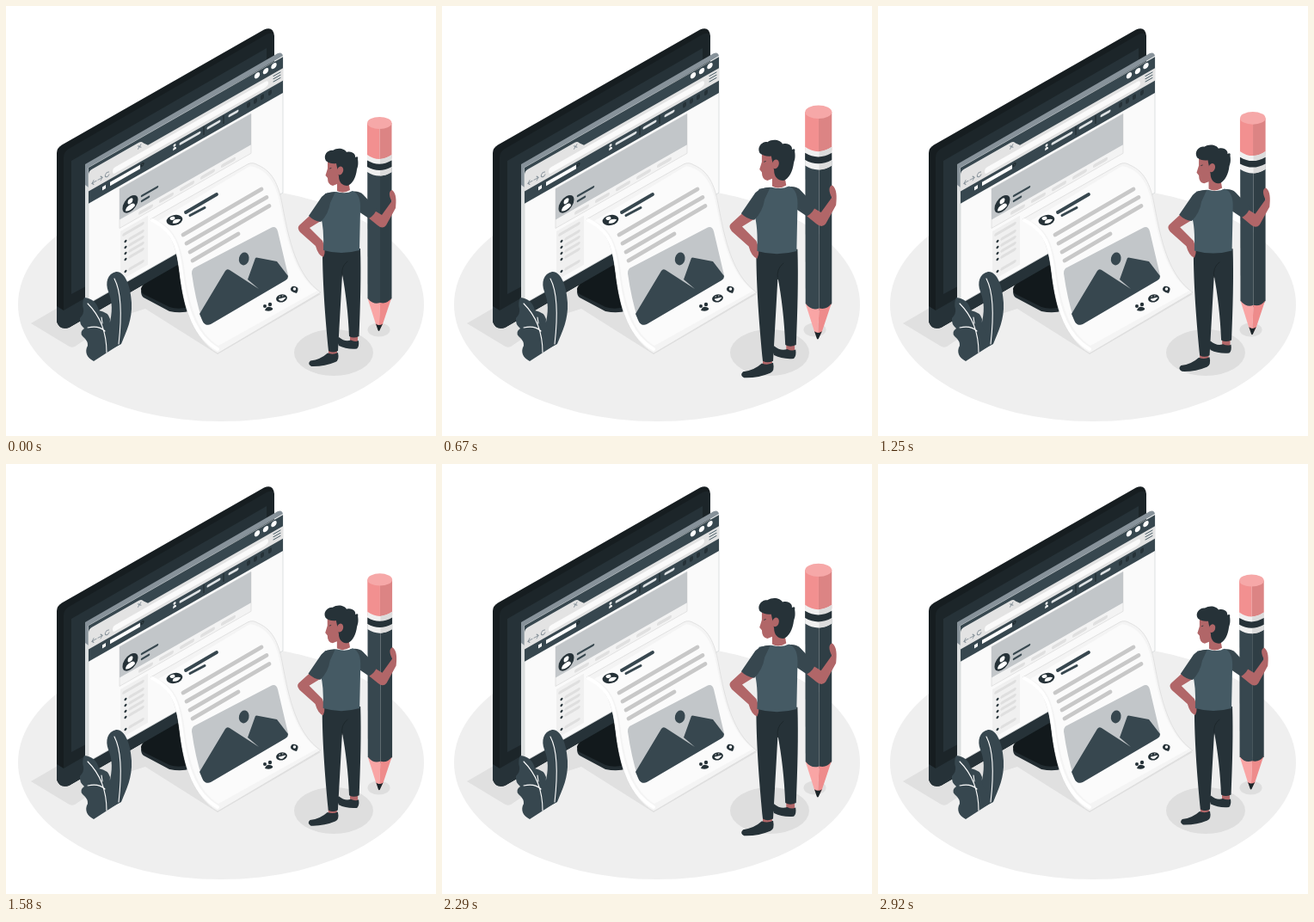
Animation of 500 by 500 pixels, one loop 2.96 s. Source, as an HTML page:

```html
<!DOCTYPE html>
<html lang="en">
<head>
<meta charset="utf-8">
<style>
html, body { margin: 0; width: 100%; height: 100%; overflow: hidden; background: #fff }
svg { display: block; width: 100vw; height: 100vh }
.dark { fill: #263238 }
.slate { fill: #37474f }
.skin { fill: #b16668 }
.line { fill: none; stroke-linecap: round }
</style>
</head>
<body>
<svg viewBox="0 0 500 500">
  <ellipse cx="250" cy="347" rx="236" ry="136" fill="#efefef"/>
  <path d="M29 369 60 351 200 290 366 335 246 405 162 352 130 362 80 396Q76 398 72 395Z" fill="#e0e0e0"/>
  <ellipse cx="381" cy="403" rx="46" ry="27" fill="#dedede"/>
  <ellipse cx="433.500" cy="376.500" rx="13" ry="8" fill="#dedede"/>

  <!-- monitor -->
  <path d="M157 331 188 347Q200 352 215 346V354Q205 358 190 355L160 339Q157 337 157 331Z" fill="#222c31"/>
  <path d="M157 330Q157 325 163 321L197 301 215 300V349Q202 354 190 350L160 335Q157 333 157 330Z" fill="#12191c"/>
  <path d="M59 171Q59 165 65 161.500L300 27.500Q311 23 312 35V236L73 374Q62 377 59 367Z" fill="#161d20"/>
  <path d="M67 176Q67 170 73 166L303 33Q312 29 312 38V236L73 374Q67 376 67 369Z" fill="#1c2529"/>
  <path d="M76 180 303 49V214L76 335Z" class="dark"/>
  <path d="M59 349 67 354 312 213V236L73 374Q62 377 59 367Z" class="dark"/>

  <!-- browser window -->
  <path d="M92 184 316 55Q321 53 322 58L96 190V346L92 343Z" fill="#87929a"/>
  <path d="M92 208 96 211V346L92 343Z" fill="#dcdfe0"/>
  <g transform="matrix(1 -.57 0 1 96 188)">
    <path d="M0 0H226V158H0Z" fill="#fafafa" stroke="#d5d8da" stroke-width=".7"/>
    <path d="M0 0H226V41.800H0Z" class="slate"/>
    <path d="M0 27.500V8Q0 4 4 4H58Q62 4 64 8L69 13H226V27.500Z" fill="#e3e3e3"/>
    <path d="M31 17H205Q209 17 209 20.500T205 24H31Q28 24 28 20.500T31 17Z" fill="#fafafa"/>
    <g fill="#fff">
      <circle cx="196" cy="4.500" r="3.200"/><circle cx="206" cy="5" r="3.200"/><circle cx="215.500" cy="4.500" r="3.200"/>
      <path d="M16 31.500H20V35.500H16ZM25 31H60V35.500H25Z"/>
      <circle cx="100" cy="31" r="1.500"/><path d="M98 36Q98 33 100 33T102 36Z"/>
    </g>
    <g class="line" stroke="#87929a" stroke-width="1">
      <path d="M57.500 7.500 61 11M61 7.500 57.500 11M9 20.500H4L6 18M4 20.500 6 23M11 20.500H16L14 18M16 20.500 14 23"/>
      <path d="M23.500 18.500A2.500 2.500 0 1 0 24 21.500"/>
      <path d="M215 16H223M215 19.300H223M215 22.500H223" stroke="#455a64"/>
      <circle cx="62.500" cy="32" r="1.500" stroke="#1c262a"/>
      <path d="M107 33H129M139 33H152M164 33H173" stroke="#dfe3e5" stroke-width="3"/>
      <path d="M134 29V38M157 29V38" stroke="#1c262a"/>
      <path d="M186 32V34M194 32V34M202 32V34M211 32V34" stroke="#263238" stroke-width="4"/>
    </g>
    <path d="M36 45H189V91H36Z" fill="#f3f3f3" stroke="#dedede" stroke-width=".7"/>
    <path d="M36 45H189V81H36Z" fill="#c2c6c9"/>
    <circle cx="48.500" cy="70" r="9" class="dark"/>
    <circle cx="48.500" cy="66.500" r="3" fill="#fff"/>
    <path d="M43 75Q43 70.500 48.500 70.500T54 75Q48.500 78.500 43 75Z" fill="#fff"/>
    <path d="M62 68H80M62 74H70" class="line" stroke="#37474f" stroke-width="2.500"/>
    <path d="M60 86.500H73M84 86.500H97M108 86.500H121M132 86.500H145M156 86.500H169" class="line" stroke="#e0e0e0" stroke-width="4"/>
    <path d="M37 95H69V152H37Z" fill="#f0f0f0"/>
    <g class="line" stroke="#dfdfdf" stroke-width="3.500">
      <path d="M41 101H63M48 110H63M48 117H63M48 124H63M48 131H63M48 145H63"/>
      <path d="M43 110h0M43 117h0M43 124h0M43 131h0M43 145h0" stroke="#263238" stroke-width="3"/>
    </g>
  </g>

  <!-- sheet -->
  <path d="M168 248 281 184Q287 181 293 185C312 193 318 212 322 235C329 272 338 314 366 333L246 404C218 387 208 354 203 318C199 286 197 263 168 248Z" fill="#f4f4f4" stroke="#dcdcdc" stroke-width=".8"/>
  <path d="M177 250 284 186C309 191 316 214 320 237C327 273 336 313 362 331L247 395C224 381 214 351 209 317C205 283 200 262 177 250Z" fill="#fbfbfb"/>
  <path d="M170 249C199 263 201 286 205 318C210 354 220 384 246 399" class="line" stroke="#fff" stroke-width="4"/>
  <g transform="rotate(-12 196 249)">
    <ellipse cx="196" cy="249" rx="9.500" ry="6" class="dark"/>
    <ellipse cx="194" cy="246.500" rx="3" ry="2" fill="#fff"/>
    <path d="M193 252Q194 248.500 198 248.500T203 250Q199 254.500 193 252Z" fill="#fff"/>
  </g>
  <g class="line" stroke="#37474f" stroke-width="3.800">
    <path d="M209 240 245 219"/><path d="M214 243.500 231 234.500" stroke-width="3"/>
    <path d="M206 266 297 213M210 276 303 222.500M214 286 306 232.500M217 296 270 265" stroke="#c8c8c8" stroke-width="4.800"/>
  </g>
  <path d="M218 305 308 258Q314 255 316 262L328 313Q329 317 325 319L238 370Q231 373 228 365Q220 340 216 311Q216 307 218 305Z" fill="#c2c6c9"/>
  <path d="M225 358 255 308Q257 305 260 307L294 329 281 318 290 293Q291 292 294 293L315 297 328 314Q328 317 325 319L238 370Q231 373 228 365Z" class="slate"/>
  <ellipse cx="276.700" cy="294" rx="5.800" ry="7.500" transform="rotate(12 277 294)" class="slate"/>
  <g class="dark">
    <circle cx="301" cy="349" r="2"/><circle cx="307" cy="347" r="2.200"/>
    <path d="M301 354Q303 349 307 350T310 353Q307 356 301 354Z"/>
    <ellipse cx="320.500" cy="340" rx="6.500" ry="4.600" transform="rotate(-12 320 340)"/>
    <path d="M338 334Q330 332 331 328.500T336 326Q342 327 338 334Z"/>
  </g>
  <path d="M317 341Q321 345 325 339ZM317.500 338h1.500M321 337h1.500" fill="#fff" stroke="#fff" stroke-width=".8"/>
  <circle cx="335.500" cy="329" r="1.700" fill="#fff"/>

  <!-- plant -->
  <path d="M128 309C118 311 115 322 119 332C124 345 124 355 120 372L113 404 134 393C140 378 147 365 146 345C145 325 138 308 128 309Z" class="slate"/>
  <path d="M91 339C100 340 106 345 108 354Q119 356 121 364Q120 371 124 377L133 393 102 413C94 409 91 402 95 395Q96 390 89 384Q85 379 91 375Q85 370 86 363Q91 358 90 352Q88 345 91 339Z" class="slate"/>
  <path d="M126 317C136 336 134 367 131 393M95 346C111 362 117 382 117 403M95 374Q108 371 115 378M111 362 112 369" class="line" stroke="#fff" stroke-width="1.100"/>

  <g id="hero">
    <!-- pencil -->
    <path d="M420 136H434.500V184Q425 183 420 177Z" fill="#f29090"/>
    <path d="M434.500 136H448.500V177Q444 183 434.500 184Z" fill="#dc8484"/>
    <ellipse cx="434.300" cy="136" rx="14.200" ry="7" fill="#f6a8a8"/>
    <path d="M420.200 188H435V347Q424 347 420.500 340Z" class="slate"/>
    <path d="M435 188H448.500V340Q445 347 435 347Z" fill="#2f3e45"/>
    <path d="M420 173Q434 183 448.500 173V193Q434 202 420 193Z" fill="#f0f0f0"/>
    <path d="M435 178Q443 177 448.500 173V193Q443 197 435 197.500Z" fill="#dcdcdc"/>
    <path d="M420 179.500Q434 188 448.500 179.500V187Q434 195 420 187Z" class="dark"/>
    <path d="M420.500 340Q427 348 435 345L433.500 378 430 370Z" fill="#f9a5a5"/>
    <path d="M435 345Q443 347 448 340L438 370 433.500 378Z" fill="#ee8b8b"/>
    <path d="M430 369.500Q434 372.500 438 369.500L434.500 377Q433.500 379 432.500 377Z" fill="#1c262a"/>

    <!-- legs -->
    <path d="M400 382H409V391H400ZM375 399H385V406H375Z" class="skin"/>
    <path d="M410 389Q411 396 408 398.500Q396 399.500 387 395Q384 388 387 385Q394 391 401 388.500Q406 391 410 389Z" class="dark"/>
    <path d="M386 403Q388 412 383 414Q370 419.500 355 419Q350 416 354 412.500Q366 411 374 403.500Q380 406 386 403Z" class="dark"/>
    <path d="M368 282H412C413 312 412 350 410.500 384Q404 387 399 384C398 358 395 333 391 312L386 401Q380 404 375 401C372 370 368 326 368 282Z" class="dark"/>
    <path d="M391 314Q389 303 397 297" class="line" stroke="#1c262a" stroke-width=".8"/>

    <!-- arms and torso -->
    <path d="M427 237 437 243 448.500 227C445 220 445 215 449 214C454 218 454 226 453 235L442 255Q438 260 432 255L421 246Z" class="skin"/>
    <path d="M353 244 341 255Q338 258 342 263L360 279Q363 290 369 292Q373 284 368 273L353 258 366 250Z" class="skin"/>
    <path d="M400 216Q410 214 415 219L431 236Q429 243 422 247L407 237Z" class="slate"/>
    <path d="M384 216Q396 219 403 215Q413 219 412 237L411 284Q390 290 369 284Q370 258 366 245L371 218Z" fill="#455a64"/>
    <path d="M383 216Q372 216 367 222L352 244Q358 250 366 251Q375 242 377 229Z" class="slate"/>

    <!-- head -->
    <path d="M374 181V189L371.500 197 374 200Q374 208 380 209L385 207V215Q392 219 400 214L398 203 399 182Z" class="skin"/>
    <path d="M372 180C368 173 375 167 380 168C386 164 394 166 396 170C403 168 407 173 406 176Q410 174 409 178C410 184 409 187 408 190C407 199 403 207 397 209C391 209 387 205 387 198L384 183Q377 184 372 180Z" class="dark"/>
    <ellipse cx="388.500" cy="191.500" rx="3.600" ry="5" transform="rotate(18 388.500 191.500)" class="skin"/>
    <path d="M376.500 189 378 188.500" class="line" stroke="#263238" stroke-width=".8"/>
  </g>
</svg>
<script>
const LOOP = 2960;
// time in ms, pulse from 0 to 1
const beats = [[0, 0], [582, 1], [1708, 0], [2345, 1], [2945, 0], [LOOP, 0]];
const hero = document.getElementById('hero');

function pulse(t) {
  const i = beats.findIndex(b => b[0] > t);
  const [t0, a] = beats[i - 1], [t1, b] = beats[i];
  return a + (b - a) * (t - t0) / (t1 - t0);
}

function draw() {
  const scale = 1 + .1 * pulse(performance.now() % LOOP);
  hero.setAttribute('transform', `translate(396.700 274.300) scale(${scale}) translate(-396.700 -274.300)`);
  requestAnimationFrame(draw);
}
draw();
</script>
</body>
</html>
```
